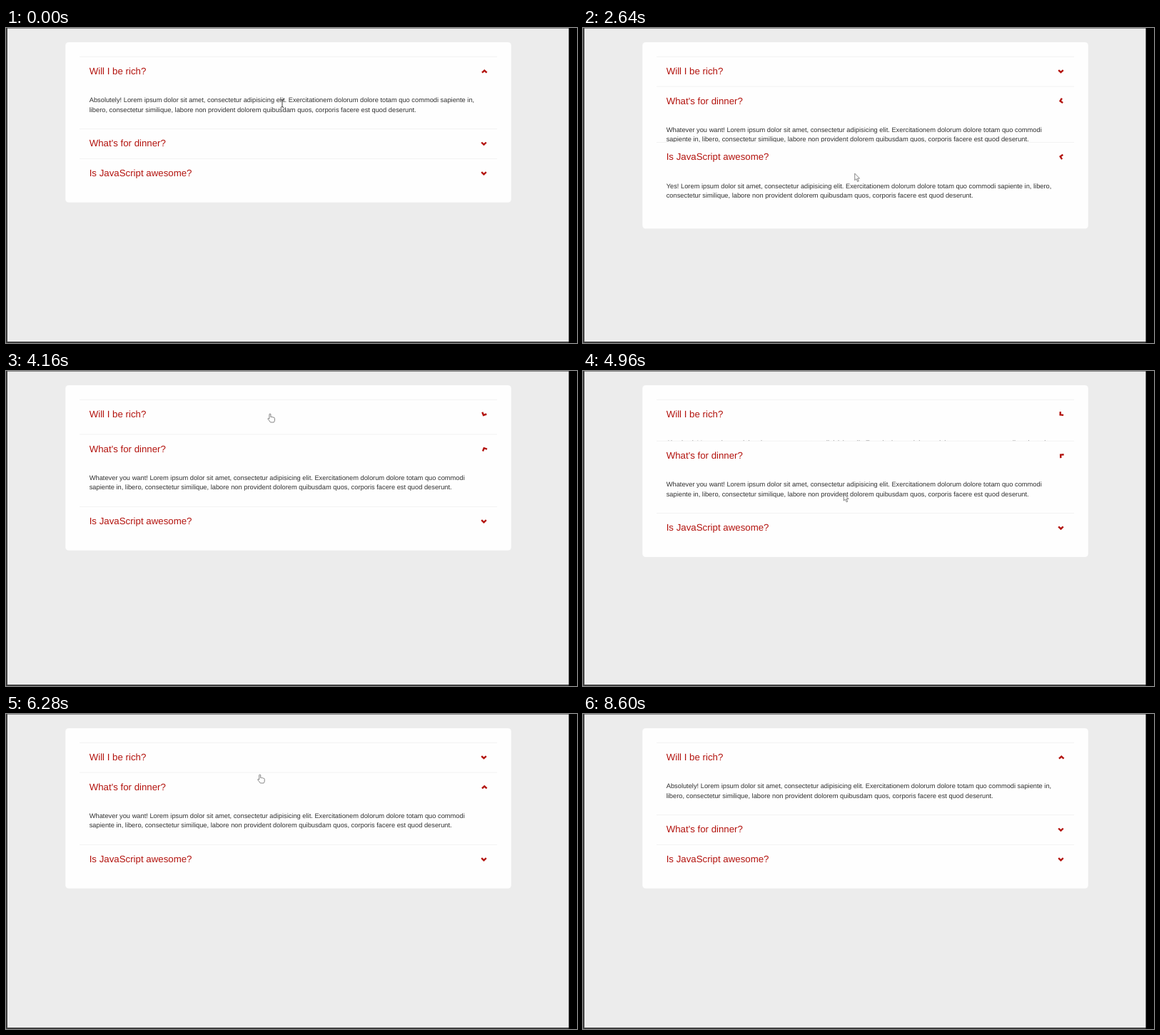
An HTML page that plays this animation: 800 px wide and 442 px high, repeating every 8.64 s.

```html
<!DOCTYPE html>
<html lang="en">
<head>
<meta charset="utf-8">
<title>Accordion</title>
<style>
  html, body { margin: 0; width: 100%; height: 100%; overflow: hidden; background: #ececec; }
  svg { display: block; width: 100vw; height: 100vh; }
  text { font-family: "Liberation Sans", Arial, sans-serif; text-rendering: geometricPrecision; white-space: pre; }
  .title { font-size: 13.28px; fill: #b3130e; }
  .body { font-size: 9.31px; fill: #303030; }
  .chevron { fill: none; stroke: #b3130e; stroke-width: 2.4; }
  .pointer { fill: #fff; stroke: #666; stroke-width: .8; stroke-linejoin: round; }
</style>
</head>
<body>
<svg viewBox="0 0 800 442" preserveAspectRatio="none">
  <rect width="800" height="442" fill="#ececec"/>
  <rect width="789" height="1" fill="#8a8a8a"/>
  <rect width="2" height="442" fill="#414141"/>
  <rect y="440" width="789" height="2" fill="#414141"/>
  <rect x="788.5" width="11.5" height="442"/>
  <rect id="card" x="83.3" y="20" width="624.5" rx="4.5" fill="#fefefe"/>
  <g id="items"></g>
  <g id="cursor">
    <path id="hand" class="pointer" d="M-1 .6Q0-.6 1 .6V4.6Q2.2 3.6 3 4.9Q4.2 4.1 4.9 5.3Q6.3 4.8 6.5 6.5V9Q6.4 10.8 5.3 12H.6Q-.8 9.8-3 7.4Q-3.4 5.7-1 7.1Z"/>
    <path id="arrow" class="pointer" d="M0 0V9.6L2.2 7.6L3.9 11.4L5.5 10.7L3.8 7H6.8Z"/>
    <path id="beam" fill="none" stroke="#444" d="M-2.5-5.5Q0-5.5 0-4Q0-5.5 2.5-5.5M0-4.5V4.5M-2.5 5.5Q0 5.5 0 4Q0 5.5 2.5 5.5"/>
  </g>
</svg>
<script>
const LOOP = 8640, HEADER = 41.7, CONTENT = 59.7, MAX_HEIGHT = 98, FIRST_TOP = 40;

// grip: how far below its top edge a header gets clicked
const entries = [
  { title: "Will I be rich?", grip: 20, lines: [
    "Absolutely! Lorem ipsum dolor sit amet, consectetur adipisicing elit. Exercitationem dolorum dolore totam quo commodi sapiente in,",
    "libero, consectetur similique, labore non provident dolorem quibusdam quos, corporis facere est quod deserunt."] },
  { title: "What's for dinner?", grip: 31, lines: [
    "Whatever you want! Lorem ipsum dolor sit amet, consectetur adipisicing elit. Exercitationem dolorum dolore totam quo commodi",
    "sapiente in, libero, consectetur similique, labore non provident dolorem quibusdam quos, corporis facere est quod deserunt."] },
  { title: "Is JavaScript awesome?", grip: 21, lines: [
    "Yes! Lorem ipsum dolor sit amet, consectetur adipisicing elit. Exercitationem dolorum dolore totam quo commodi sapiente in, libero,",
    "consectetur similique, labore non provident dolorem quibusdam quos, corporis facere est quod deserunt."] }
];

const clickTimes = [1723, 2500, 3395, 4100, 4790, 5290, 5684, 6674];

const $ = id => document.getElementById(id);
const clamp = v => Math.min(1, Math.max(0, v));
const smooth = v => (v = clamp(v), v * v * (3 - 2 * v));

// Open item after n clicks: 0 1 2 1 0 1 2 1 0
const openItem = n => 2 - Math.abs(2 - n % 4);

// The pointer rests at each header around its click, drifting left over time.
const stops = clickTimes.map((time, n) => {
  const before = openItem(n), item = openItem(n + 1);
  const top = FIRST_TOP + item * HEADER + (before < item ? CONTENT : 0);
  return { arrive: time - 60, leave: time + 240, x: 386 - (time - clickTimes[0]) / 148, y: top + entries[item].grip };
});
stops.unshift({ leave: 1120, x: 387, y: 106 });
stops.push({ arrive: 7240, leave: 7240, x: 350, y: -14 });

function pointerAt(t) {
  const i = stops.findIndex(stop => t < stop.leave);
  if (i < 0) return null;
  const to = stops[i], from = stops[i - 1] || to;
  const k = i ? smooth((t - from.leave) / (to.arrive - from.leave)) : 1;
  return [from.x + (to.x - from.x) * k, from.y + (to.y - from.y) * k];
}

$("items").innerHTML = entries.map(({ title, lines }, i) => `
  <g id="item${i}">
    <path d="M103 .3H688" stroke="#f2f2f2"/>
    <text class="title" x="116.7" y="25.1">${title}</text>
    <path id="chevron${i}" class="chevron" d="M-3.3-1.4L0 1.7L3.3-1.4"/>
    <clipPath id="clip${i}"><rect id="window${i}" x="84" y="${HEADER}" width="623"/></clipPath>
    <g clip-path="url(#clip${i})">
      ${lines.map((line, n) => `<text class="body" x="116.7" y="${64.4 + 13.3 * n}">${line}</text>`).join("")}
    </g>
  </g>`).join("");

function draw(t) {
  const count = clickTimes.filter(time => time <= t).length;
  const current = openItem(count);
  const previous = count ? openItem(count - 1) : -1;
  const elapsed = count ? t - clickTimes[count - 1] : Infinity;
  const slide = smooth((elapsed - 30) / 190);
  const turn = smooth(elapsed / 260);
  const openness = (i, k) => i === current ? k : i === previous ? 1 - k : 0;

  const pointer = pointerAt(t);
  let shape = "arrow", top = FIRST_TOP;
  entries.forEach((_, i) => {
    const height = Math.min(CONTENT, MAX_HEIGHT * openness(i, slide));
    const angle = 180 * openness(i, turn);
    $("item" + i).setAttribute("transform", `translate(0 ${top})`);
    $("window" + i).setAttribute("height", height);
    $("chevron" + i).setAttribute("transform", `translate(669.9 20.9) rotate(${angle}) translate(-.4 -.4)`);
    if (pointer) {
      const y = pointer[1] - top;
      if (y >= 0 && y < HEADER) shape = "hand";
      else if (turn === 1 && i === current && y > 55 && y < 83) shape = "beam";
    }
    top += HEADER + height;
  });
  $("card").setAttribute("height", top);

  $("cursor").style.display = pointer ? "" : "none";
  if (pointer) $("cursor").setAttribute("transform", `translate(${pointer})`);
  for (const id of ["hand", "arrow", "beam"]) $(id).style.display = id === shape ? "" : "none";
}

const start = performance.now();
function tick() {
  draw((performance.now() - start) % LOOP);
  requestAnimationFrame(tick);
}
tick();
</script>
</body>
</html>
```
